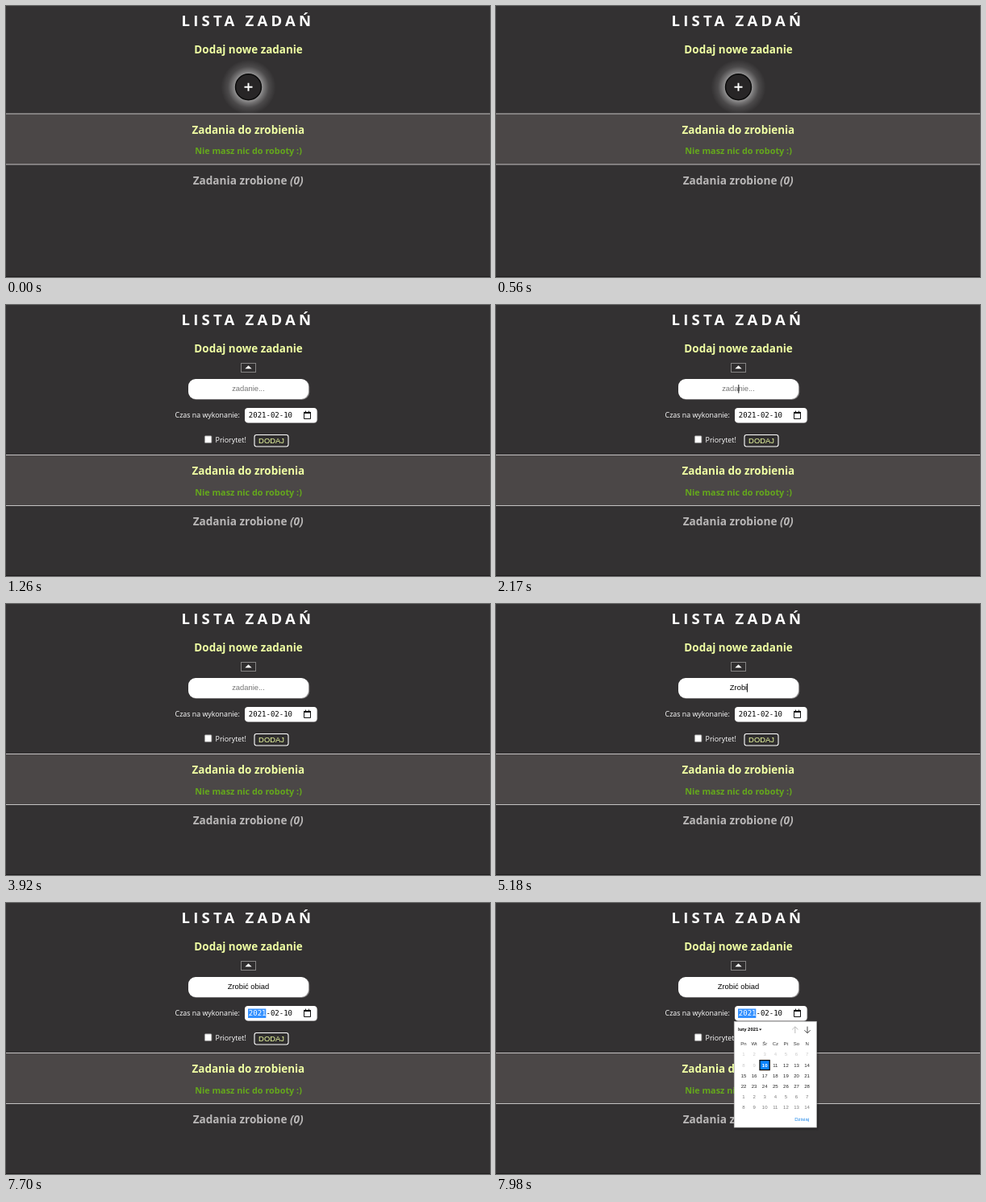
Write an HTML page that moves like this. It is 600 px wide and 337 px high and loops after 8 s.

```html
<!DOCTYPE html>
<html lang="pl">
<head>
<meta charset="utf-8">
<title>Lista zadań</title>
<style>
  html, body { margin: 0; width: 100%; height: 100%; overflow: hidden; background: #333132; }
  svg { display: block; width: 100%; height: 100%; }
  text { font-family: "Open Sans", "Noto Sans", sans-serif; white-space: pre; }
  .mid { text-anchor: middle; }
  .bold { font-weight: 700; }
  .heading { font-size: 13.45px; font-weight: 700; fill: #efffa3; }
  .label { font-size: 8.85px; font-weight: 500; fill: #fff; }
  .arial, .calendar text { font-family: "Liberation Sans", Arial, sans-serif; }
  .arial { font-size: 9.4px; }
  .mono { font-family: "DejaVu Sans Mono", "Noto Sans Mono", monospace; font-size: 9px; }
  .calendar text { font-size: 6px; }
</style>
</head>
<body>
<svg viewBox="0 0 600 337">
  <defs>
    <radialGradient id="glow">
      <stop offset=".47" stop-color="#fff" stop-opacity=".5"/>
      <stop offset=".6" stop-color="#fff" stop-opacity=".3"/>
      <stop offset=".75" stop-color="#fff" stop-opacity=".12"/>
      <stop offset="1" stop-color="#fff" stop-opacity="0"/>
    </radialGradient>
    <filter id="shadow" x="-10%" y="-10%" width="120%" height="120%">
      <feDropShadow dx="1" dy="1.5" stdDeviation="1.5" flood-opacity=".45"/>
    </filter>
  </defs>

  <rect width="600" height="337" fill="#333132"/>
  <rect y="336" width="600" height="1" fill="#1f1d1e"/>
  <text class="bold" x="217.6" y="25" font-size="18.5" letter-spacing="4.2" fill="#fff">LISTA ZADAŃ</text>
  <text class="heading mid" x="300.6" y="59">Dodaj nowe zadanie</text>

  <g id="addButton">
    <circle cx="300.5" cy="100.8" r="34" fill="url(#glow)"/>
    <circle cx="300.5" cy="100.8" r="16" fill="#272526" stroke="#080808" stroke-width="1.4"/>
    <path d="M295.5 100.8h10M300.5 95.8v10" stroke="#fff" stroke-width="1.9"/>
  </g>

  <g id="lists">
    <rect y="134" width="600" height="63" fill="#4b4747"/>
    <path d="M0 134h600M0 197h600" stroke="#c4c2c2"/>
    <text class="heading mid" x="300.4" y="158.7">Zadania do zrobienia</text>
    <text class="bold mid" x="300.5" y="184" font-size="10.85" fill="#65a81c">Nie masz nic do roboty :)</text>
    <text class="heading mid" x="300.2" y="221.8" style="fill:#b9b7b7;font-size:13.6px">Zadania zrobione <tspan font-style="italic">(0)</tspan></text>
  </g>

  <g id="form">
    <rect x="291.5" y="72.5" width="18" height="11" fill="#302e2f" stroke="#858383"/>
    <path d="M296.3 79.3l4.2-4 4.2 4z" fill="#fff"/>

    <rect x="226.4" y="92.4" width="149.8" height="25.4" rx="9.5" fill="#8d8b8c"/>
    <rect x="226" y="92" width="149" height="25" rx="9" fill="#fff"/>
    <text id="entry" class="arial mid" x="300.5" y="107.2"></text>
    <path id="caret" d="M0 99v10.6" stroke="#000" stroke-width=".9"/>

    <text class="label" x="209.6" y="140">Czas na wykonanie:</text>
    <rect x="296.2" y="128.2" width="90" height="18.8" rx="4.5" fill="#8d8b8c"/>
    <rect x="296" y="128" width="89.4" height="18.2" rx="4" fill="#fff"/>
    <rect id="yearMark" x="300" y="131.5" width="22.3" height="11.5" fill="#3390ff"/>
    <text class="mono" x="300.8" y="140.4"><tspan id="year">2021</tspan>-02-10</text>
    <path d="M369.5 133.5h8v8h-8zM371.5 131.6v2M375.5 131.6v2" fill="none" stroke="#111"/>
    <path d="M369 134h9" stroke="#111" stroke-width="2"/>

    <rect x="246.3" y="162.8" width="8.6" height="8.6" rx="1" fill="#fff" stroke="#8a8888" stroke-width=".8"/>
    <text class="label" x="259.6" y="171.4">Priorytet!</text>
    <rect x="308" y="161.5" width="42" height="14.5" rx="2.5" fill="#302e2f" stroke="#fff" stroke-width="1.1"/>
    <text class="arial mid" x="329" y="171.8" fill="#efffa3">DODAJ</text>
  </g>

  <g id="calendar" class="calendar">
    <rect x="295.3" y="147.3" width="102" height="131.7" fill="#fff" stroke="#bfbfbf" stroke-width=".7" filter="url(#shadow)"/>
    <text class="bold" x="300" y="159.4" style="font-size:5.9px">luty 2021</text>
    <path d="M326 156.4h3.4l-1.7 2z" fill="#111"/>
    <g fill="none" stroke-width=".9">
      <path d="M370.8 162v-8M367.2 157.4l3.6-3.6 3.6 3.6" stroke="#b5b5b5"/>
      <path d="M386 153.6v8M382.4 158.2l3.6 3.6 3.6-3.6" stroke="#333"/>
    </g>
    <rect x="327" y="195.6" width="12.2" height="12" fill="#0b84ff" stroke="#101010" stroke-width="1.3"/>
    <g id="days"></g>
    <text x="370.2" y="271.2" style="font-size:6.1px" fill="#1783e8">Dzisiaj</text>
  </g>
</svg>
<script>
  const LOOP = 8000, OPEN = 600, FOCUS = 2110, DATE_FOCUS = 7690, PICK = 7760, BLINK = 343;
  const SHIFT = 52.5;
  const TYPED = "Zrobić obiad";
  const KEY_TIMES = [4550, 4760, 4900, 5040, 5110, 5390, 5670, 5810, 5950, 6090, 6230, 6350];
  const $ = id => document.getElementById(id);
  const show = (id, on) => $(id).style.display = on ? "" : "none";

  function addCell(col, row, label, fill, bold) {
    const cell = document.createElementNS("http://www.w3.org/2000/svg", "text");
    cell.setAttribute("x", 307 + 13.1 * col);
    cell.setAttribute("y", 177.3 + 13.15 * row);
    cell.setAttribute("class", bold ? "mid bold" : "mid");
    cell.setAttribute("fill", fill);
    cell.textContent = label;
    $("days").append(cell);
  }

  function dayColor(i) {
    if (i < 9) return "#c9c9c9";
    if (i === 9) return "#fff";
    return i < 28 ? "#222" : "#777";
  }

  ["Pn", "Wt", "Śr", "Cz", "Pt", "So", "N"].forEach((name, col) => addCell(col, 0, name, "#333"));
  for (let i = 0; i < 42; i++)
    addCell(i % 7, 1 + Math.floor(i / 7), i % 28 + 1, dayColor(i), i === 9);

  function render(t) {
    const open = t >= OPEN, onDate = t >= DATE_FOCUS;
    show("addButton", !open);
    show("form", open);
    $("lists").setAttribute("transform", `translate(0 ${open ? SHIFT : 0})`);
    show("calendar", t >= PICK);
    show("yearMark", onDate);
    $("year").setAttribute("fill", onDate ? "#fff" : "#000");

    const count = KEY_TIMES.filter(time => time <= t).length;
    const entry = $("entry");
    entry.textContent = count ? TYPED.slice(0, count) : "zadanie...";
    entry.setAttribute("fill", count ? "#000" : "#757575");

    // The caret blink restarts with every key.
    const since = t - (count ? KEY_TIMES[count - 1] : FOCUS);
    const caretOn = since >= 0 && !onDate && Math.floor(since / BLINK) % 2 === 0;
    show("caret", caretOn);
    if (caretOn) {
      const half = count ? entry.getComputedTextLength() / 2 : 0;
      $("caret").setAttribute("transform", `translate(${300.8 + half} 0)`);
    }
  }

  const start = performance.now();
  function tick() {
    render((performance.now() - start) % LOOP);
    requestAnimationFrame(tick);
  }
  tick();
</script>
</body>
</html>
```
